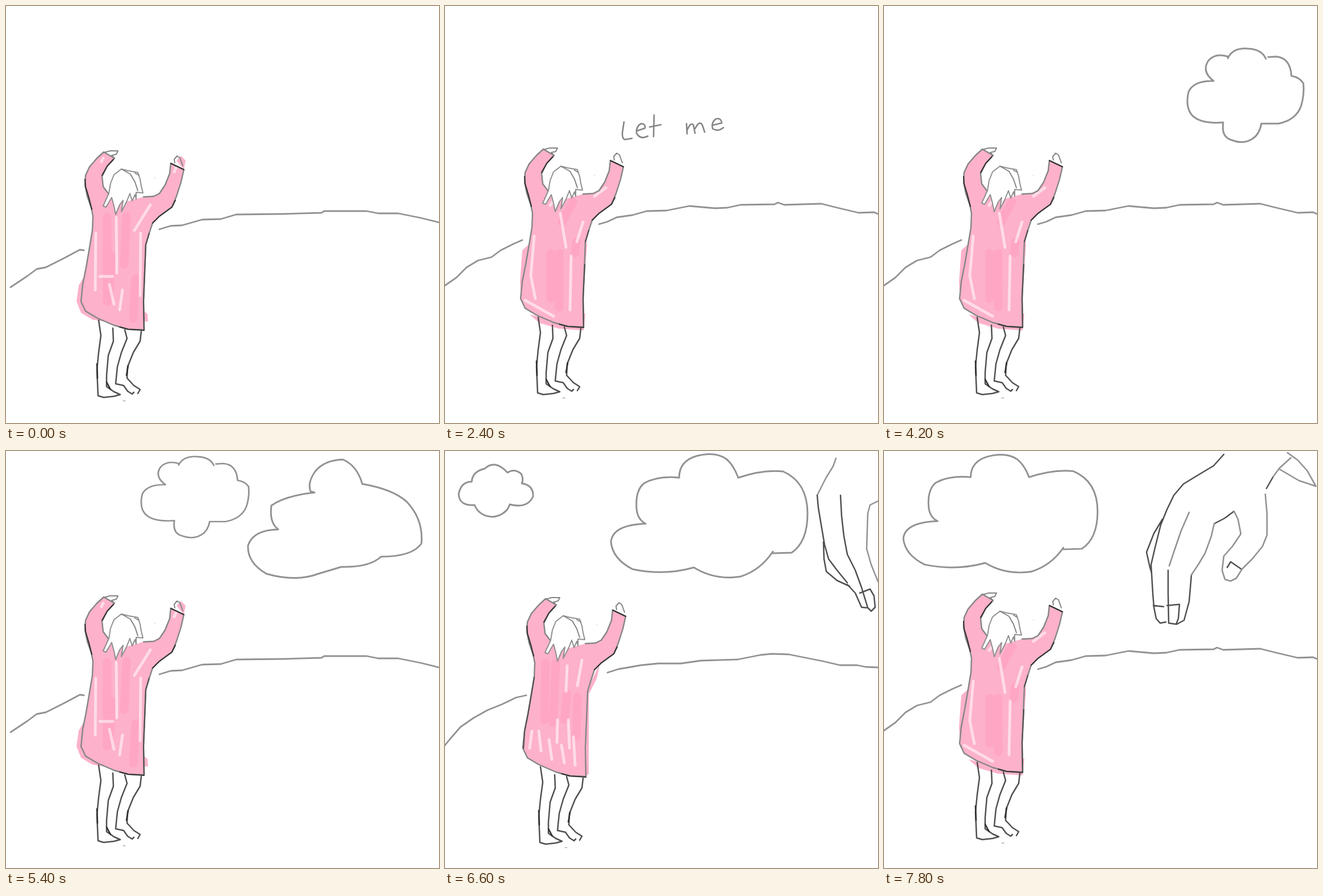
An HTML page that plays this animation: 762 by 734 pixels, repeating every 8 s.

```html
<!DOCTYPE html>
<html lang="en">
<head>
<meta charset="utf-8">
<title>Let me out</title>
<style>
html, body { margin: 0; width: 100%; height: 100%; overflow: hidden; background: #fff; }
svg { display: block; width: 762px; height: 734px; }
path { fill: none; stroke: #929292; stroke-width: 3; stroke-linecap: round; stroke-linejoin: round; }
.fine { stroke: #858585; stroke-width: 2; }
.dark { stroke: #505050; stroke-width: 2.5; }
.ink { stroke: #303030; stroke-width: 2.6; }
.hair { fill: #fff; stroke: #909090; stroke-width: 2; }
.pink { fill: #fdb1cb; stroke: none; }
.deep { stroke: #ffa6c5; }
.light { stroke: #fff; stroke-opacity: .55; }
.word { stroke: #858585; stroke-width: 2.6; }
</style>
</head>
<body>
<svg id="stage" viewBox="0 0 762 734" role="img" aria-label="Let me out"></svg>
<script>
const STEP = 600, LOOP = 8000;
const stage = document.getElementById('stage');

const path = (d, cls = '', width = 0) =>
  `<path class="${cls}" d="${d}"${width ? ` style="stroke-width:${width}"` : ''}/>`;
const place = (inner, x, y, sx = 1, sy = sx) =>
  `<g transform="translate(${x} ${y}) scale(${sx} ${sy})">${inner}</g>`;

// Woman, seen from behind
const leftSide = '172,257 160,268 147,283 140,298 139,315 143,335 150,355 153,370 152,395 147,425 141,460 135,490 132,520 140,537 160,549 190,562 215,569 243,570';
const rightSide = '243,570 242,520 244,470 246,420 252,400 258,382 270,370 292,354 300,335 308,310 313,288 290,277';
const rightInner = '290,277 288,295 280,315 270,330 260,335 242,336';
const leftInner = '180,330 171,318 169,300 178,282 191,268';
const coat = `M${leftSide} ${rightSide} ${rightInner} 206,346 ${leftInner}Z`;

const lines =
  path(`M${leftSide}M${rightInner}M${leftInner} 172,257M${rightSide}`, 'fine', 2.4) +
  path('M139,305L140,318 146,338 151,358M258,382L270,370 292,354 298,342M290,277L313,288M169,298L178,282 189,270M200,565L215,569 243,571', 'ink', 2) +
  path('M203,287L190,297 184,312 181,330 171,352 176,354 186,337 190,352 193,367 200,350 206,342 203,362 212,345 218,330 222,343 227,332 229,340 229,328 241,329 238,317 236,305 232,293 215,290Z', 'hair') +
  path('M203,287L219,296 227,310 232,325M227,294L234,298', 'fine') +
  path('M172,258L183,255 197,255 194,261 186,263 191,268M297,276L296,270 301,264 306,267 311,281', 'fine') +
  path('M163,553L167,580 163,610 160,640 162,686 172,689 190,687 201,684 190,679 177,670 177,650 180,615 189,590 188,567M209,570L213,585 203,610 196,635 193,665 207,668 214,678 222,683 225,680M238,573L236,590 224,610 214,635 213,655 225,668 236,675 232,682', 'dark') +
  path('M160,630L161,655M177,662L184,675M215,633L212,650', 'ink') +
  path('M206,695h4M262,303h.1', 'fine', 1);

const poses = [
  { x: 0, y: 0,
    spill: 'M141,470L128,492 124,520 132,540 152,552 200,560 250,555 249,542 240,535ZM300,272L308,264 316,272 313,288Z',
    deep: 'M178,372V520M212,370L208,455M228,480L224,550M186,440L182,510',
    light: 'M194,372L195,470M158,400L157,500M237,400L236,510M171,268L168,274M182,490L190,525M205,500L200,535M165,476H188M300,283L296,292M254,350L226,395',
    edge: 'M252,400L246,420 244,470 242,520 243,570',
    land: 'M8,495L20,487 38,475 54,463 70,460 82,454 100,445 115,437 130,429 137,430M270,393L290,387 310,386 345,376 378,375 405,367 490,366 555,364 560,361 635,361 655,365 690,365 730,373 762,381' },
  { x: 1, y: -5,
    spill: 'M146,425L135,435 131,490 133,525ZM148,548L165,563 200,573 243,576 246,546 200,560ZM246,410L249,425 245,480Z',
    deep: 'M185,440V520M200,440V535M224,350L205,385M230,420L228,440',
    light: 'M221,445L219,540M156,410L150,480 158,520M242,385L231,420M202,370L212,430M140,523L190,551M190,348L184,356M262,340L282,325',
    edge: 'M252,400L246,420M245,460L242,520 243,570',
    land: 'M0,492L20,478 38,460 58,448 82,442 98,430 120,419 136,412M271,384L285,380 302,372 330,368 355,361 390,360 430,352 475,356 497,355 520,350 580,349 586,346 597,350 662,348 690,355 728,364 755,363 762,366' },
  { x: 5, y: 3,
    spill: 'M268,370L262,398 248,425 248,565 243,570 244,420Z',
    deep: 'M172,370L170,470M190,370L185,475M210,425L205,470M228,430L226,500',
    light: 'M160,490L164,525M178,505L183,540M200,515L205,546M221,500L224,550M236,365L228,410M210,375L208,420M148,490L144,520M193,470L192,510M212,470L214,520',
    edge: 'M152,395L147,425 141,460 135,490 133,520',
    land: 'M0,518L8,508 27,486 50,470 75,456 100,446 125,434 143,430M286,390L305,384 345,377 375,374 415,374 450,369 515,367 555,359 575,357 605,358 640,365 665,370 695,377 725,377 740,380 762,381' }
];

const woman = p => path(p.land, '', 2.8) + place(
  path(coat, 'pink') + path(p.spill, 'pink') + path(p.deep, 'deep', 15) +
  path(p.light, 'light', 5) + lines + path(p.edge, 'dark', 2.2), p.x, p.y);

const words = [
  'M319,230L316,250Q316,261 321,261L333,259M341,246L356,241Q357,233 349,233Q340,238 341,250Q348,262 361,255M372,218L371,256M364,239L384,235',
  'M429,233L430,251M430,245Q436,230 441,235L444,250M444,242Q452,226 457,236L461,248M474,236L491,232Q490,222 480,225Q472,232 475,242Q484,248 494,240',
  'M530,224Q518,228 520,242Q526,252 537,244Q544,228 530,224M547,228Q546,246 556,247Q567,244 566,227L567,246M578,208L579,238Q584,250 591,246M569,230L591,225'
];
const say = (count, x, y) => place(path(words.slice(0, count).join(''), 'word'), x, y);

// Clouds: outline with its own left and top edge
const puffy = { left: 534, top: 73, d: 'M605,88Q583,81 571,95Q558,114 580,131Q545,130 536,150Q530,175 541,190Q555,207 597,204Q593,230 612,235Q632,243 648,233Q661,225 664,206L694,206Q725,200 734,175Q740,155 738,135Q732,125 717,122Q715,90 690,88L676,89M672,92Q665,75 640,74Q614,72 605,91' };
const tall = { left: 425, top: 13, d: 'M627,57Q618,25 593,14Q560,15 544,35Q530,55 536,70L543,72Q490,78 467,95Q463,125 479,137Q435,138 426,165Q424,195 458,215Q510,230 550,215L590,203Q640,204 660,185Q715,185 731,162Q735,120 705,88Q680,66 627,57' };
const wide = { left: 292, top: 5, d: 'M353,128Q338,120 337,100Q335,70 350,57Q375,43 412,47Q412,18 442,9Q475,0 495,14Q508,25 516,47Q560,32 595,36Q638,55 638,110Q638,160 610,179L577,180M577,177Q555,210 520,221Q475,228 438,205Q385,220 330,208Q295,190 292,160Q295,130 353,128' };
const small = { left: 24, top: 22, d: 'M47,54Q48,36 70,31Q88,14 110,38Q122,30 134,40Q139,50 135,57Q156,60 155,80Q145,102 114,94Q108,112 85,116Q60,115 52,95Q25,97 24,76Q28,54 47,54' };
const cloud = (c, left, top, sx = 1, sy = sx) =>
  place(path(c.d), left - c.left * sx, top - c.top * sy, sx, sy);

const fingertips =
  path('M688,13L683,27 670,48 655,78M762,88L748,95 744,110 742,172 750,200 762,230', '', 2.5) +
  path('M655,78L657,100 662,130 668,165 675,190 690,210 708,232M666,160L667,190 671,212 690,228 712,238M708,235L722,250 733,275 742,276M696,78L698,115 702,150 708,182 722,210 733,240 744,276 750,282 757,275 755,255 748,243 730,250', 'dark');
const hand =
  path('M598,6L580,26 550,44 527,58 510,78 498,103 487,130 477,170 470,200 473,250 475,275 479,295 486,303 496,301M490,120L475,145 462,178 468,205 471,215M500,210L500,250 501,303 515,305 528,298 537,265 541,218M474,272L492,274M498,272L520,270 518,295 514,305M604,205L610,195 629,208M673,66L685,45M581,128L600,118 616,106', 'dark') +
  path('M537,108L523,140 512,172 502,202M541,218L553,200 565,180 576,150 581,128M616,106L623,120 628,146 613,168 598,185 595,210 600,226 610,229 620,224 630,208 648,190 666,168 674,148 674,110 671,76M685,45L696,30 716,12M696,32L730,52 760,62 745,35 728,16 710,3', '', 2.6);

const scenes = {
  3: () => say(1, -5, -3),
  4: () => say(2, -4, -26),
  5: () => say(3, 0, 0),
  6: () => cloud(puffy, 665, 87),
  7: () => cloud(puffy, 534, 74),
  8: () => cloud(puffy, 386, 27, .96, .93) + cloud(tall, 575, 28),
  9: () => cloud(puffy, 238, 9, .926, .867) + cloud(tall, 425, 14),
  10: () => cloud(small, 122, 16, 1.2) + cloud(wide, 362, 8),
  11: () => cloud(small, 24, 22) + cloud(wide, 292, 5) + fingertips,
  12: () => cloud(small, -80, 22) + cloud(wide, 163, 5) + place(hand, 120, -10),
  13: () => cloud(wide, 34, 6, .988, .955) + hand
};

let shown = -1;
function draw(now) {
  const step = Math.floor(now % LOOP / STEP);
  if (step !== shown) {
    shown = step;
    stage.innerHTML = woman(poses[step % 3]) + (scenes[step] ? scenes[step]() : '');
  }
  requestAnimationFrame(() => draw(performance.now() - start));
}
const start = performance.now();
draw(0);
</script>
</body>
</html>
```
